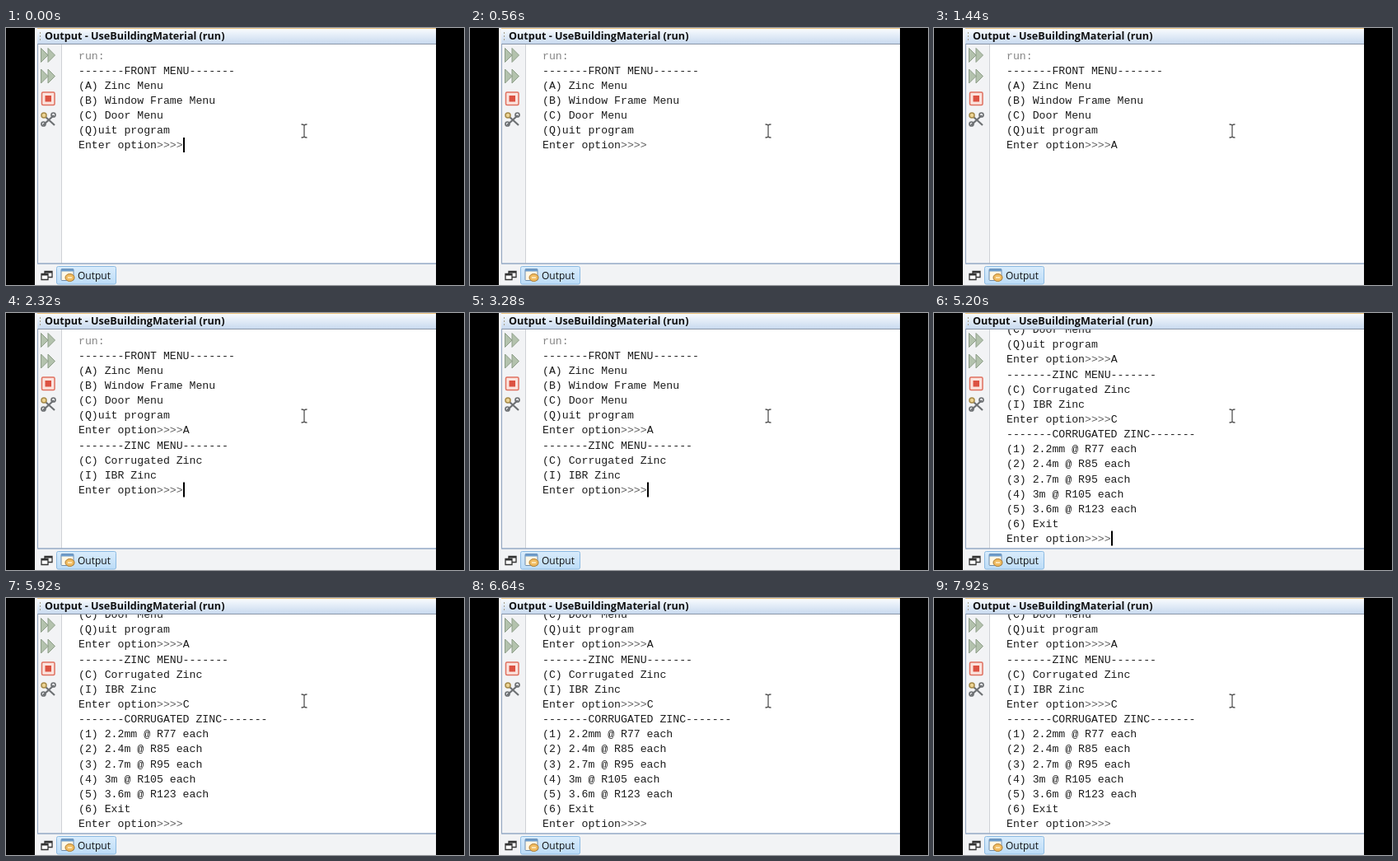
Write an HTML page that moves like this. It is 556 px wide and 312 px high and loops after 8000 ms.

```html
<!DOCTYPE html>
<html lang="en">
<head>
<meta charset="utf-8">
<title>Console output</title>
<style>
  html, body { margin: 0; width: 100%; height: 100%; overflow: hidden; background: #000; }
  svg { display: block; width: 556px; height: 312px; }
  .ui { font-family: "Open Sans", "Noto Sans", sans-serif; fill: #111; }
  #rows { font: 13.2px "Liberation Mono", "Courier New", monospace; fill: #1c1c1c; white-space: pre; }
  .dim { fill: #606060; }
</style>
</head>
<body>
<svg viewBox="0 0 556 312">
  <defs>
    <linearGradient id="bar" x2="0" y2="1">
      <stop offset="0" stop-color="#fbfdff"/><stop offset="1" stop-color="#c9daef"/>
    </linearGradient>
    <linearGradient id="tab" x2="0" y2="1">
      <stop offset="0" stop-color="#d9ecfc"/><stop offset="1" stop-color="#bcdcf7"/>
    </linearGradient>
    <clipPath id="view"><path d="M68 20H522V285H68z"/></clipPath>
    <g id="run" fill="#b3c2ad" stroke="#8d9d88">
      <path d="M42.500 -8.500L51 0L42.500 8.500zM51 -8.500L59.500 0L51 8.500z"/>
    </g>
  </defs>

  <!-- window -->
  <rect width="556" height="312"/>
  <rect x="35" width="487" height="312" fill="#f2f3f5"/>
  <rect x="38" width="484" height="19" fill="url(#bar)"/>
  <path d="M38 .5H522" stroke="#ecc27c"/>
  <path d="M38 19.500H522" stroke="#8b97a8"/>
  <path d="M41.500 5V15" stroke="#a8a08c" stroke-dasharray="2 2"/>
  <rect x="68" y="20" width="454" height="266" fill="#fff"/>
  <path d="M67.500 20V286" stroke="#cfd2d6"/>
  <path d="M38.500 19V286" stroke="#8fa3bd"/>
  <path d="M38 286H522" stroke="#93a9c6" stroke-width="1.500"/>
  <text class="ui" x="47" y="13.500" font-size="12.600" font-weight="700">Output - UseBuildingMaterial (run)</text>

  <!-- toolbar -->
  <use href="#run" y="33"/>
  <use href="#run" y="58.500"/>
  <rect x="43.500" y="78" width="15.500" height="15.500" rx="1.500" fill="#fbe3dd" stroke="#df705f" stroke-width="1.500"/>
  <rect x="47.500" y="82" width="7.500" height="7.500" fill="#dc5242"/>
  <g fill="none" stroke="#6d7073" stroke-width="2.200">
    <path d="M48 108L59 118M58 106L45 118"/>
    <circle cx="57.500" cy="105.500" r="2.500" stroke-width="1.700"/>
    <circle cx="45.500" cy="116.500" r="2.500" stroke-width="1.700"/>
    <circle cx="46" cy="106" r="3" fill="#ecd394" stroke="#a68a48" stroke-width="1.500"/>
  </g>

  <!-- bottom tabs -->
  <g fill="#fff" stroke="#333" stroke-width="1.300">
    <path d="M47 295.500H56V302.500H47z"/>
    <path d="M43 298.500H51V305.500H43z"/>
    <path d="M47 296.500H56M43 299.500H51" stroke-width="1.800"/>
  </g>
  <rect x="61.500" y="289.500" width="72" height="21.500" rx="2" fill="url(#tab)" stroke="#8dbbe3"/>
  <rect x="67" y="292.500" width="15" height="14" rx="1" fill="#fff8e6" stroke="#718dab"/>
  <path d="M67 294H82" stroke="#6b9bcb" stroke-width="3"/>
  <ellipse cx="77.500" cy="303" rx="5.500" ry="4.500" fill="#f0bc62" stroke="#ae7a2c"/>
  <path d="M75 303H80" stroke="#fff2cf" stroke-width="1.500"/>
  <text class="ui" x="87" y="304.700" font-size="12">Output</text>

  <!-- console -->
  <g clip-path="url(#view)">
    <g id="page">
      <g id="rows"></g>
      <rect id="caret" width="2" height="18" fill="#000"/>
    </g>
  </g>
  <path d="M358.500 117Q361 117 362 118Q363 117 365.500 117M362 118V132M358.500 133Q361 133 362 132Q363 133 365.500 133"
        fill="none" stroke="#555" stroke-width="1.300"/>
</svg>
<script>
const PROMPT = "Enter option>>>>";
const LINES = [
  "run:", "-------FRONT MENU-------", "(A) Zinc Menu", "(B) Window Frame Menu",
  "(C) Door Menu", "(Q)uit program", PROMPT,
  "-------ZINC MENU-------", "(C) Corrugated Zinc", "(I) IBR Zinc", PROMPT,
  "-------CORRUGATED ZINC-------", "(1) 2.2mm @ R77 each", "(2) 2.4m @ R85 each",
  "(3) 2.7m @ R95 each", "(4) 3m @ R105 each", "(5) 3.6m @ R123 each", "(6) Exit", PROMPT
];
const LEFT = 88, TOP = 33.7, PITCH = 18.13, CHAR = 7.92;
const LOOP = 8000, BLINK = 500;

// Each step: start time, last visible row, typed letter, caret column, scroll, blink start
const STEPS = [
  { at: 0, row: 6, key: "", col: 16, scroll: 0, blink: 0 },
  { at: 900, row: 6, key: "A", col: 17, scroll: 0, blink: 900 },
  { at: 2240, row: 10, key: "", col: 16, scroll: 0, blink: 2240 },
  { at: 4600, row: 10, key: "C", col: 16, scroll: 0, blink: 2240 },
  { at: 4700, row: 10, key: "C", col: 17, scroll: 0, blink: 4700 },
  { at: 5120, row: 18, key: "", col: 16, scroll: 86, blink: 5120 }
];
const ANSWERS = { 6: "A", 10: "C" };

const get = id => document.getElementById(id);
const rows = get("rows"), page = get("page"), caret = get("caret");
const rowY = i => TOP + i * PITCH;
let shown;

function rowMarkup(line, i, step) {
  const typed = i < step.row ? ANSWERS[i] || "" : step.key;
  const body = line.replace(">>>>", '<tspan class="dim">&gt;&gt;&gt;&gt;</tspan>');
  const tone = i ? "" : ' fill="#858585"';
  return `<text x="${LEFT}" y="${rowY(i) + 4}"${tone}>${body}${typed}</text>`;
}

function show(step) {
  rows.innerHTML = LINES.slice(0, step.row + 1).map((line, i) => rowMarkup(line, i, step)).join("");
  page.setAttribute("transform", `translate(0 ${-step.scroll})`);
  caret.setAttribute("x", Math.round(LEFT + step.col * CHAR));
  caret.setAttribute("y", rowY(step.row) - 9.5);
  shown = step;
}

function draw(now) {
  const t = now % LOOP;
  const step = STEPS.findLast(s => s.at <= t) || STEPS[0];
  if (step !== shown) show(step);
  const on = Math.floor((t - step.blink) / BLINK) % 2 === 0;
  caret.setAttribute("visibility", on ? "visible" : "hidden");
  requestAnimationFrame(draw);
}
draw(performance.now());
</script>
</body>
</html>
```
